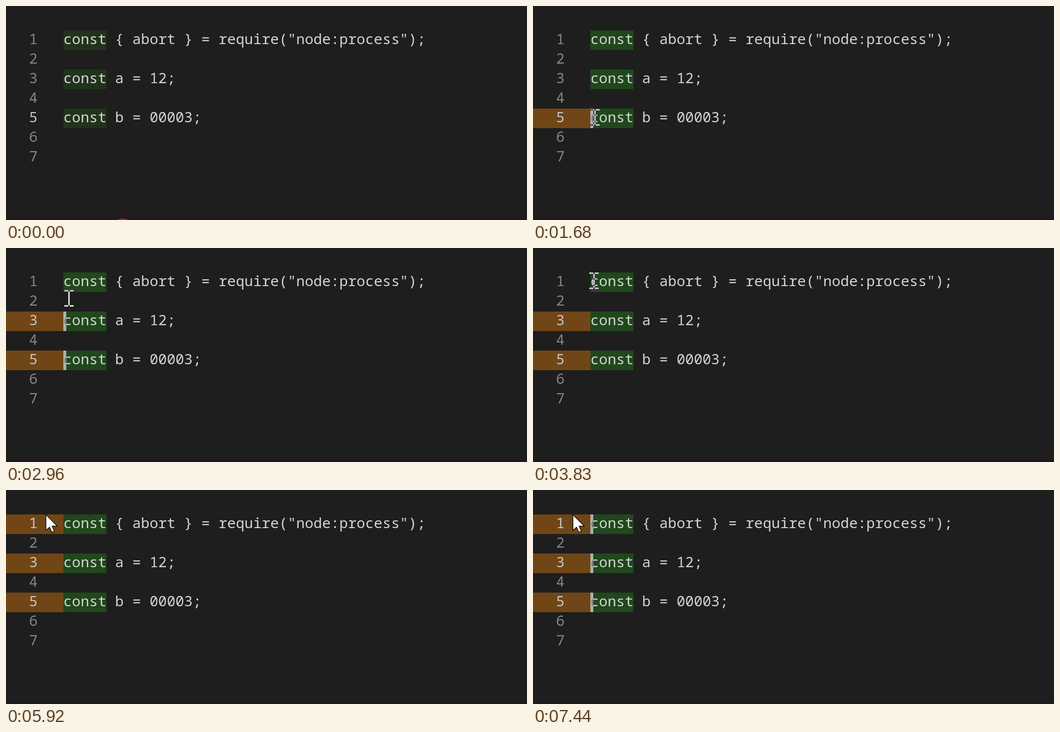
An HTML page with a canvas that plays this animation: 1063x438 px, repeating every 7.99 s.

```html
<!DOCTYPE html>
<html lang="en">
<head>
<meta charset="utf-8">
<title>Multi-cursor editing</title>
<style>
  html, body { margin: 0; width: 100%; height: 100%; overflow: hidden; background: #1e1e1e; }
  canvas { display: block; }
  #keys { position: absolute; left: 0; top: 294px; width: 1063px; height: 84px; background: rgba(0, 0, 0, .5); opacity: 0; }
  #key {
    position: absolute; left: 183px; top: 8px; width: 152px; height: 68px; box-sizing: border-box;
    border: 2px solid #6c6c6c; border-radius: 9px; box-shadow: inset 0 -6px #666; background: #1c1c1c;
    color: #fff; font: 50px/72px Roboto, sans-serif; text-align: center; white-space: nowrap;
  }
</style>
</head>
<body>
<canvas id="stage" width="1063" height="438"></canvas>
<div id="keys"><div id="key">Alt+F</div></div>
<script>
const ctx = document.getElementById("stage").getContext("2d");
const keys = document.getElementById("keys");
const LOOP = 7990, BLINK = 497, LINE = 40, TOP = 50, LEFT = 117;
const KEYS_SHOWN = 6680, KEYS_HIDDEN = 7440, ARROW_SHOWN = 4720;

const lines = [
  { code: 'const { abort } = require("node:process");', clicked: 4430 },
  { code: "" },
  { code: "const a = 12;", clicked: 2870 },
  { code: "" },
  { code: "const b = 00003;", clicked: 1680 },
  { code: "" },
  { code: "" }
];
const clicks = lines.map(line => line.clicked).filter(Boolean);
const focused = Math.min(...clicks);

const origin = { x: 236, y: 458 };
const moves = [
  { start: 0, end: 130, x: 386, y: 392 },
  { start: 130, end: 440, x: 134, y: 176 },
  { start: 500, end: 750, x: 130, y: 238 },
  { start: 940, end: 1100, x: 126, y: 228 },
  { start: 1700, end: 1980, x: 121, y: 158 },
  { start: 2890, end: 2960, x: 128, y: 103 },
  { start: 3040, end: 3400, x: 124, y: 67 },
  { start: 4660, end: 4800, x: 81, y: 50 }
];

function pointerAt(t) {
  let { x, y } = origin;
  for (const move of moves) {
    const p = Math.min(1, Math.max(0, (t - move.start) / (move.end - move.start)));
    x += (move.x - x) * p;
    y += (move.y - y) * p;
  }
  return { x: Math.round(x), y: Math.round(y) };
}

// Each click restarts the blinking with a visible caret.
function caretVisible(t) {
  const lastClick = Math.max(...clicks.filter(click => click <= t));
  return t >= focused && Math.floor((t - lastClick) / BLINK) % 2 === 0;
}

function rect(color, x, y, w, h) {
  ctx.fillStyle = color;
  ctx.fillRect(x, y, w, h);
}

function text(color, string, x, y) {
  ctx.fillStyle = color;
  ctx.fillText(string, x, y);
}

function drawLine({ code, clicked }, i, t) {
  const y = TOP + i * LINE, baseline = y + 28;
  const selected = t >= clicked;
  if (selected) rect("#714616", 0, y, LEFT, LINE);
  if (code) rect(t < focused ? "#20341c" : "#20481c", LEFT, y, 88, LINE);
  text(selected || i === 4 ? "#c6c6c6" : "#858585", i + 1, 47, baseline);
  text("#d4d4d4", code, LEFT, baseline);
  if (selected && caretVisible(t)) drawCaret(code[0], y, baseline);
}

function drawCaret(letter, y, baseline) {
  ctx.save();
  ctx.beginPath();
  ctx.rect(LEFT, y, 6, LINE);
  ctx.clip();
  rect("#aeafad", LEFT, y, 6, LINE);
  text("#747573", letter, LEFT, baseline);
  ctx.restore();
}

function drawRing(x, y) {
  ctx.strokeStyle = "#f00";
  ctx.lineWidth = 4;
  ctx.beginPath();
  ctx.arc(x, y, 22, 0, 2 * Math.PI);
  ctx.stroke();
}

// The text pointer inverts whatever lies below it.
function drawBeam(x, y) {
  ctx.globalCompositeOperation = "difference";
  for (const edge of [y - 17, y + 14]) {
    rect("#fff", x - 9, edge, 8, 3);
    rect("#fff", x + 2, edge, 8, 3);
  }
  rect("#fff", x - 1, y - 14, 3, 28);
  ctx.globalCompositeOperation = "source-over";
}

function drawArrow(x, y) {
  ctx.save();
  ctx.translate(x, y);
  const shape = new Path2D("M.5 .5V32.5L8 26L12.5 36.5L17.5 34.3L13 24H23.5Z");
  ctx.fillStyle = "#fff";
  ctx.strokeStyle = "#000";
  ctx.lineWidth = 1.3;
  ctx.fill(shape);
  ctx.stroke(shape);
  ctx.restore();
}

function draw(now) {
  const t = now % LOOP;
  const { x, y } = pointerAt(t);
  rect("#1e1e1e", 0, 0, 1063, 438);
  rect("#1f1820", 0, 434, 1063, 4);
  ctx.font = "29.333px 'Noto Sans Mono', monospace";
  lines.forEach((line, i) => drawLine(line, i, t));

  const sincePress = t - lines[2].clicked;
  if (t < focused || (sincePress >= 0 && sincePress < 90)) drawRing(x + 1, y + 2);
  (t < ARROW_SHOWN ? drawBeam : drawArrow)(x, y);

  const keysVisible = t >= KEYS_SHOWN && t < KEYS_HIDDEN;
  keys.style.opacity = keysVisible ? Math.min(1, .53 + (t - KEYS_SHOWN) / 450) : 0;
  requestAnimationFrame(() => draw(performance.now() - start));
}

const start = performance.now();
draw(0);
</script>
</body>
</html>
```
